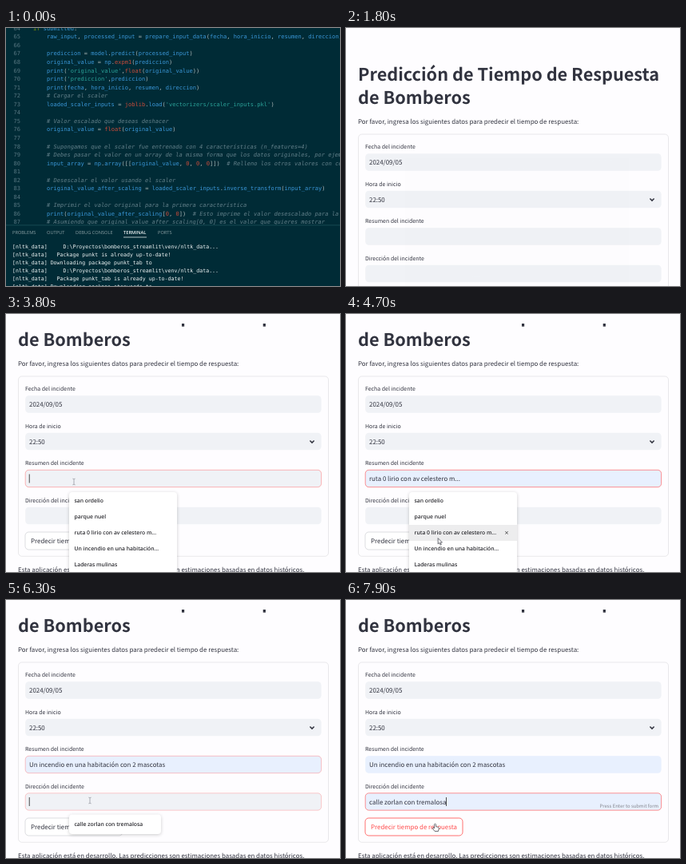
Write an HTML page with a canvas that moves like this. It is 418x323 px and loops after 8000 ms.

```html
<!DOCTYPE html>
<html lang="es">
<head>
<meta charset="utf-8">
<title>Predicción de Tiempo de Respuesta</title>
<style>
html, body { margin: 0; width: 100%; height: 100%; overflow: hidden; background: #fff; }
canvas { display: block; width: 418px; height: 323px; }
</style>
</head>
<body>
<canvas id="stage"></canvas>
<script>
const W = 418, H = 323, LOOP = 8000;
const canvas = document.getElementById('stage');
const dpr = window.devicePixelRatio || 1;
canvas.width = W * dpr;
canvas.height = H * dpr;
const stage = canvas.getContext('2d');
let ctx = stage;

const SANS = '"Noto Sans CJK JP", "Noto Sans CJK SC", "Noto Sans CJK", "Open Sans", sans-serif';
const MENU = '"Open Sans", "Noto Sans", sans-serif';
const MONO = '"DejaVu Sans Mono", monospace';
const BODY = '7.92px ' + SANS, LABEL = '6.94px ' + SANS, HINT = '5.94px ' + SANS;
const HEAD = 'bold 21.7px ' + SANS;
const PAPER = '#fefdff', INK = '#31333f', RED = '#ff4b4b', FIELD = '#f0f2f6', FILLED = '#e8f0fe';

const clamp = v => Math.max(0, Math.min(1, v));
const ramp = (t, a, b) => clamp((t - a) / (b - a));
const ease = k => k * k * (3 - 2 * k);

function text(str, x, y, font, color, align = 'left') {
  ctx.font = font;
  ctx.fillStyle = color;
  ctx.textAlign = align;
  ctx.fillText(str, x, y);
}

function rect(x, y, w, h, color) {
  ctx.fillStyle = color;
  ctx.fillRect(x, y, w, h);
}

function box(x, y, w, h, r, fill, stroke, alpha = 1) {
  ctx.beginPath();
  ctx.roundRect(x, y, w, h, r);
  if (fill) { ctx.fillStyle = fill; ctx.fill(); }
  if (stroke && alpha > 0) {
    ctx.save();
    ctx.globalAlpha *= alpha;
    ctx.strokeStyle = stroke;
    ctx.lineWidth = 0.8;
    ctx.stroke();
    ctx.restore();
  }
}

// ---------- code editor ----------
const code = [
  'if submitted:',
  'raw_input, processed_input = prepare_input_data(fecha, hora_inicio, resumen, direccion)',
  '',
  'prediccion = model.predict(processed_input)',
  'original_value = np.expm1(prediccion)',
  "print('original_value',float(original_value))",
  "print('prediccion',prediccion)",
  'print(fecha, hora_inicio, resumen, direccion)',
  '# Cargar el scaler',
  "loaded_scaler_inputs = joblib.load('vectorizers/scaler_inputs.pkl')",
  '',
  '# Valor escalado que deseas deshacer',
  'original_value = float(original_value)',
  '',
  '# Supongamos que el scaler fue entrenado con 4 características (n_features=4)',
  '# Debes pasar el valor en un array de la misma forma que los datos originales, por ejemplo',
  'input_array = np.array([[original_value, 0, 0, 0]])  # Relleno los otros valores con ceros',
  '',
  '# Desescalar el valor usando el scaler',
  'original_value_after_scaling = loaded_scaler_inputs.inverse_transform(input_array)',
  '',
  '# Imprimir el valor original para la primera característica',
  'print(original_value_after_scaling[0, 0])  # Esto imprime el valor desescalado para la primera',
  '# Asumiendo que original_value_after_scaling[0, 0] es el valor que quieres mostrar'
];
const log = [
  '    D:\\Proyectos\\bomberos_streamlit\\venv/nltk_data...',
  '  Package punkt is already up-to-date!',
  'Downloading package punkt_tab to',
  '    D:\\Proyectos\\bomberos_streamlit\\venv/nltk_data...',
  '  Package punkt_tab is already up-to-date!',
  'Downloading package stopwords to'
];
const CODE_SIZE = '7.06px ', CODE_STEP = 4.25;

function tokenColor(s) {
  if (s[0] === '#') return '#63808a';
  if (s[0] === "'") return '#2aa198';
  if (s === 'if') return '#859900';
  if (/^(float|joblib|expm1|\d+)$/.test(s)) return '#cb4b3a';
  if (/^\w/.test(s)) return '#3a97d8';
  return '#a9b5b5';
}

function codeLine(str, x, y) {
  for (const m of str.matchAll(/#.*|'[^']*'|\w+|[^\w\s]/g)) {
    const style = m[0][0] === '#' ? 'italic ' : '';
    text(m[0], x + m.index * CODE_STEP, y, style + CODE_SIZE + MONO, tokenColor(m[0]));
  }
}

const win = { x: -41, y: -80, w: 640, h: 460 };

function paintEditor() {
  rect(win.x, win.y, win.w, win.h, '#002b36');
  text('Terminal   Help', -38, -69, '6px ' + MENU, '#c3cccc');
  text('bomberos_streamlit', 202, -69, '6px ' + MENU, '#c3cccc');
  for (let i = 0; i < 4; i++) box(494 + i * 17, -75, 7, 7, 1, null, '#e8eeee');
  text('app.py', 20, -50, '6.4px ' + MENU, '#d6dbdb');
  text('utils.py', 150, -50, '6.4px ' + MENU, '#c3cccc');
  text('general_training.ipynb', 252, -50, '6.4px ' + MENU, '#e8eeee');
  text('model_training.py', 392, -50, '6.4px ' + MENU, '#e8eeee');
  text('app.py > ...', 26, -33, '6.2px ' + MENU, '#a9b5b5');

  code.forEach((line, i) => {
    const y = 2.8 + i * 10.55;
    text(String(64 + i), 18, y, CODE_SIZE + MONO, '#567680', 'right');
    codeLine(line, i ? 51 : 34, y);
  });

  rect(win.x, 246.5, win.w, 140, '#002b36');
  rect(win.x, 246.5, win.w, 0.8, '#1c5058');
  [['PROBLEMS', 8], ['OUTPUT', 51], ['DEBUG CONSOLE', 87], ['TERMINAL', 147], ['PORTS', 190]].forEach(([name, x]) => {
    const on = name === 'TERMINAL';
    text(name, x, 258, (on ? '600 ' : '') + '5.7px ' + MENU, on ? '#f0f3f3' : '#8ba0a4');
  });
  text('streamlit   +  ···', 484, 258, '6px ' + MENU, '#e8eeee');
  rect(147, 261.5, 29, 0.9, '#c8d2d2');
  log.forEach((line, i) => text('[nltk_data] ' + line, 8, 275.5 + i * 10, '6.6px ' + MONO, '#f0f4f4'));
}

// The window is painted once so that it can fade as a single layer.
function makeLayer() {
  const layer = document.createElement('canvas');
  layer.width = win.w * dpr;
  layer.height = win.h * dpr;
  ctx = layer.getContext('2d');
  ctx.textRendering = 'geometricPrecision';
  ctx.scale(dpr, dpr);
  ctx.translate(-win.x, -win.y);
  paintEditor();
  ctx = stage;
  return layer;
}
const layer = makeLayer();
const editor = () => ctx.drawImage(layer, win.x, win.y, win.w, win.h);

// ---------- form page ----------
const story = 'Un incendio en una habitación con 2 mascotas';
const place = 'calle zorlan con tremalosa';
const options = ['san ordelio', 'parque nuel', 'ruta 0 lirio con av celestero m...',
  'Un incendio en una habitación...', 'Laderas mulinas'];

const path = [
  [2250, 150, 335], [2800, 116, 186], [3150, 116, 186], [3400, 85, 210],
  [4050, 85, 210], [4900, 120, 292], [4950, 120, 292], [5100, 112, 294],
  [5480, 112, 294], [5900, 105, 251], [6750, 105, 251], [7300, 113, 281],
  [7480, 113, 281], [7800, 111.5, 280]
];

function pointer(t) {
  let a = path[0];
  for (const b of path) {
    if (t < b[0]) {
      const k = ease(ramp(t, a[0], b[0]));
      return { x: a[1] + (b[1] - a[1]) * k, y: a[2] + (b[2] - a[2]) * k };
    }
    a = b;
  }
  return { x: a[1], y: a[2] };
}

function field(label, top, value, { fill = FIELD, focus = 0, caret = false, hint = false } = {}) {
  text(label, 24, top - 6, LABEL, INK);
  box(24.2, top + 0.3, 370.4, 21.4, 4.4, fill, RED, focus * 0.75);
  text(value, 29, top + 14.4, BODY, INK);
  if (caret) {
    ctx.font = BODY;
    rect(28.8 + ctx.measureText(value).width, top + 5.5, 0.8, 11, '#222');
  }
  if (hint) text('Press Enter to submit form', 391, top + 18.8, HINT, '#83858c', 'right');
}

function chevron(x, y) {
  ctx.beginPath();
  ctx.moveTo(x - 2.6, y - 1.4);
  ctx.lineTo(x, y + 1.3);
  ctx.lineTo(x + 2.6, y - 1.4);
  ctx.strokeStyle = INK;
  ctx.lineWidth = 1.5;
  ctx.stroke();
}

function page(t, mouse) {
  const first = ramp(t, 3640, 3880) - ramp(t, 6200, 6420);
  const second = ramp(t, 6200, 6420);
  const blink = start => (t - start) % 1000 < 500;
  const pick = Math.min(4, Math.floor((mouse.y - 224) / 20));
  const hover = t > 4050 && t < 5290 && pick >= 0;
  const hover2 = t > 6750 && t < 7490 && mouse.y > 269;

  ctx.save();
  ctx.beginPath();
  ctx.rect(0, 12, W, H);
  ctx.clip();
  ctx.translate(0, 55 * (1 - ease(ramp(t, 2750, 3050))));

  text('Predicción de Tiempo de Respuesta', 15, 10.8, HEAD, INK);
  text('de Bomberos', 15, 40, HEAD, INK);
  text('Por favor, ingresa los siguientes datos para predecir el tiempo de respuesta:', 15, 64.8, BODY, INK);
  box(15.5, 78, 388, 225.3, 4.4, null, 'rgba(49,51,63,0.13)');

  field('Fecha del incidente', 102, '2024/09/05');
  field('Hora de inicio', 148.5, '22:50');
  chevron(383, 159.8);

  let value = t >= 5290 ? story : '';
  if (hover) value = pick === 3 ? story : options[pick];
  field('Resumen del incidente', 195, value, {
    fill: value ? FILLED : FIELD,
    focus: first,
    caret: t >= 3690 && t < 6290 && !hover && blink(t < 5290 ? 3690 : 5290),
    hint: t >= 5290 && t < 6290
  });

  value = hover2 || t >= 7490 ? place : '';
  field('Dirección del incidente', 241.5, value, {
    fill: value ? FILLED : FIELD,
    focus: second,
    caret: t >= 6290 && !hover2 && blink(t < 7490 ? 6290 : 7490),
    hint: t >= 7490
  });

  const hot = ramp(t, 7550, 7800);
  box(24, 273, 122, 22, 4.4, '#fff', 'rgba(49,51,63,0.2)', 1 - hot);
  box(24, 273, 122, 22, 4.4, null, RED, hot);
  text('Predecir tiempo de respuesta', 85, 287, BODY, hot > 0.5 ? RED : INK, 'center');
  text('Esta aplicación está en desarrollo. Las predicciones son estimaciones basadas en datos históricos.',
    15, 322.6, BODY, INK);
  ctx.restore();

  menu(options, 79, 223, 135, 110, ramp(t, 3640, 3760), ramp(t, 5290, 5440), hover ? pick : t >= 5290 ? 3 : -1);
  menu([place], 79, 268.5, 115, 24.5, ramp(t, 6210, 6290), ramp(t, 7490, 7640), hover2 || t >= 7490 ? 0 : -1);
}

function menu(items, x, y, w, h, show, hide, active) {
  const alpha = show * (1 - hide);
  if (alpha <= 0) return;
  const s = 1 - 0.05 * hide, cx = x + w / 2, cy = y + h / 2;
  ctx.save();
  ctx.globalAlpha = alpha;
  ctx.translate(cx, cy);
  ctx.scale(s, s);
  ctx.translate(-cx, -cy);
  ctx.shadowColor = 'rgba(0,0,0,0.2)';
  ctx.shadowBlur = 4 * dpr;
  ctx.shadowOffsetY = dpr;
  box(x, y, w, h, 4, '#fff');
  ctx.shadowColor = 'transparent';
  items.forEach((item, i) => {
    const mid = y + (items.length > 1 ? 11 : 12.3) + i * 20;
    if (i === active) {
      rect(x, mid - 10, w, 20, '#ededee');
      text('×', x + w - 13, mid + 3, '9px ' + MENU, '#444', 'center');
    }
    text(item, x + 6.5, mid + 2.3, '600 6.8px ' + MENU, '#2b2b30');
  });
  ctx.restore();
}

// ---------- mouse pointer ----------
const arrow = new Path2D('M0 0V7.3L1.8 5.8L3 8.5L4.2 8L3 5.4H5.3Z');
const hand = new Path2D('M-1 5V.8Q0-.6 1 .8V3.6L4 4.4Q5 4.8 4.8 6L4 9.5H-.4L-3 6.2Q-3 4.8-1.8 5.2L-1 6Z');
const beam = new Path2D('M-1.6-3.8Q0-3.8 0-3Q0-3.8 1.6-3.8M0-3V3M-1.6 3.8Q0 3.8 0 3Q0 3.8 1.6 3.8');

function drawPointer(t, { x, y }) {
  if (t < 2250) return;
  const typing = (t > 3280 && t < 4180) || (t > 5780 && t < 6900);
  ctx.save();
  ctx.translate(x, y);
  ctx.lineJoin = 'round';
  if (typing) {
    ctx.lineWidth = 0.7;
    ctx.strokeStyle = '#8a8d95';
    ctx.stroke(beam);
  } else {
    const shape = t > 7560 ? hand : arrow;
    ctx.lineWidth = 0.8;
    ctx.fillStyle = '#fff';
    ctx.fill(shape);
    ctx.strokeStyle = '#4a4c55';
    ctx.stroke(shape);
  }
  ctx.restore();
}

// ---------- timeline ----------
function draw(t) {
  ctx.setTransform(dpr, 0, 0, dpr, 0, 0);
  ctx.textRendering = 'geometricPrecision';
  ctx.imageSmoothingQuality = 'high';
  if (t < 1400) {
    editor();
    return;
  }
  rect(0, 0, W, H, PAPER);
  const mouse = pointer(t);
  page(t, mouse);
  drawPointer(t, mouse);

  // the minimised editor window shrinks and fades
  const k = ramp(t, 1400, 1850);
  if (k < 1) {
    const s = 1 - 0.4 * k;
    ctx.save();
    ctx.globalAlpha = 0.3 * (1 - k) ** 2;
    ctx.translate(209, 330);
    ctx.scale(s, s);
    ctx.translate(27.6 - 209, 125.4 - 330);
    ctx.scale(0.68, 0.68);
    editor();
    ctx.restore();
  }
}

const start = performance.now();
function tick() {
  draw((performance.now() - start) % LOOP);
  requestAnimationFrame(tick);
}
tick();
</script>
</body>
</html>
```
